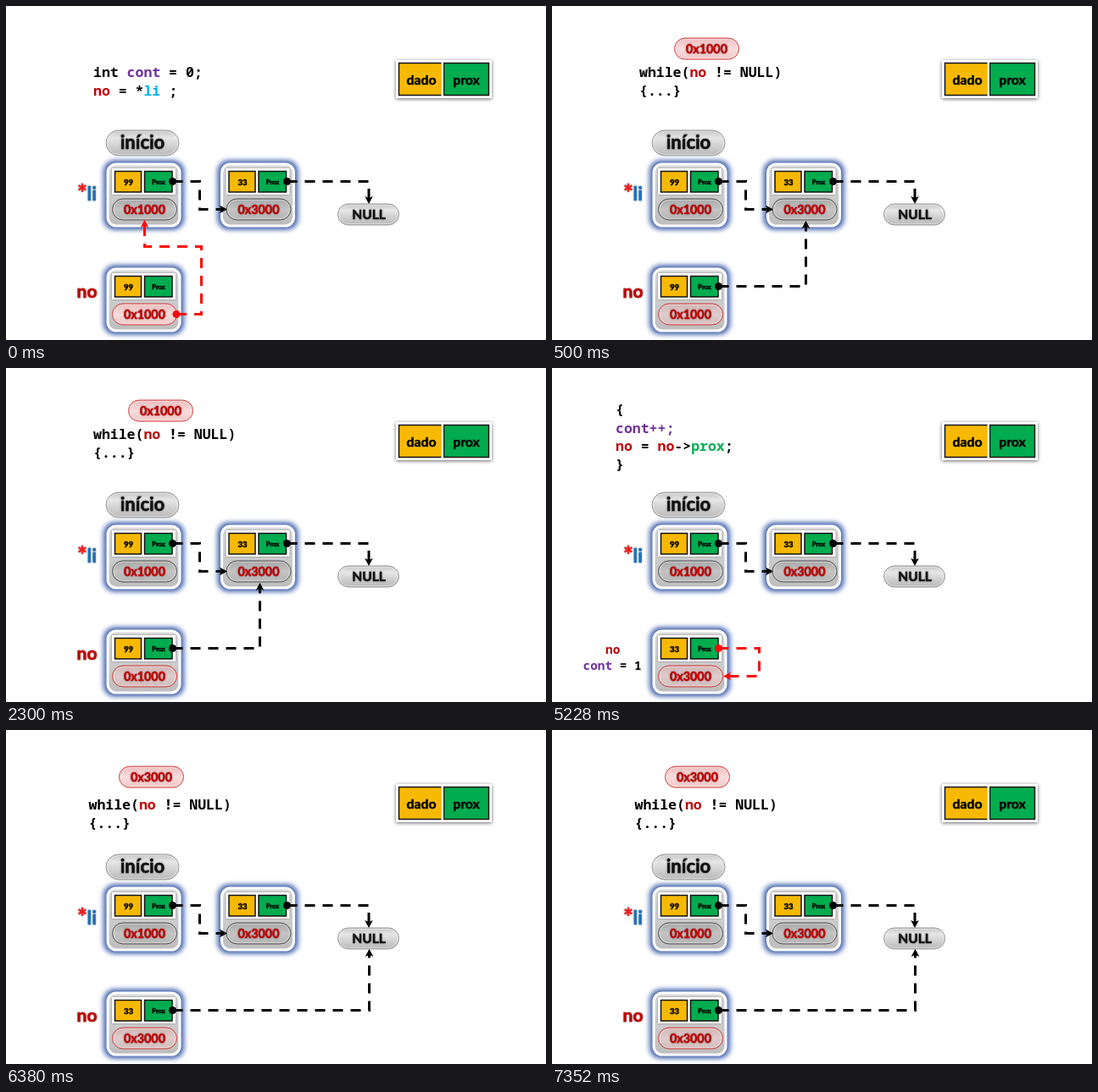
These frames come from a looping animation (637 px wide and 395 px high, 8000 ms). An HTML page:

```html
<!DOCTYPE html>
<html lang="pt">
<head>
<meta charset="utf-8">
<style>
html, body { margin: 0; height: 100%; overflow: hidden; background: #fff; }
svg { display: block; width: 637px; height: 395px; }
text { font: bold 14.3px Lato, "Open Sans", sans-serif; white-space: pre; }
.mid { text-anchor: middle; }
.heavy { stroke: currentColor; stroke-width: .5px; }
.code { font-family: "Noto Sans Mono", "DejaVu Sans Mono", monospace; font-weight: 600; }
.soft { filter: drop-shadow(.7px .7px .8px #0006); }
</style>
</head>
<body>
<svg id="stage" viewBox="0 0 637 395">
  <defs>
    <linearGradient id="grey" x2="0" y2="1">
      <stop stop-color="#c4c4c4"/><stop offset=".3" stop-color="#e6e6e6"/>
      <stop offset=".6" stop-color="#d2d2d2"/><stop offset="1" stop-color="#b8b8b8"/>
    </linearGradient>
    <linearGradient id="dark" x2="0" y2="1">
      <stop stop-color="#a8a8a8"/><stop offset=".5" stop-color="#c4c4c4"/><stop offset="1" stop-color="#b4b4b4"/>
    </linearGradient>
    <linearGradient id="pink" x2="0" y2="1">
      <stop stop-color="#eebcbc"/><stop offset=".5" stop-color="#f8dcdc"/><stop offset="1" stop-color="#f0c8c8"/>
    </linearGradient>
    <linearGradient id="rose" x2="0" y2="1">
      <stop stop-color="#d2b4b4"/><stop offset=".5" stop-color="#dfcccc"/><stop offset="1" stop-color="#d2bcbc"/>
    </linearGradient>
    <linearGradient id="panel" x2="0" y2="1">
      <stop stop-color="#dcdcdc"/><stop offset="1" stop-color="#bdbdbd"/>
    </linearGradient>
    <filter id="blur" x="-30%" y="-30%" width="160%" height="160%"><feGaussianBlur stdDeviation="2.6"/></filter>
  </defs>
  <g id="fixed"></g>
  <g id="scene"></g>
</svg>
<script>
const RED = '#c00000', PURPLE = '#7030a0', GREEN = '#00b050', CYAN = '#00b0f0';
const GOLD = '#f7b900', LEAF = '#00ac4e', HOT = '#f80a0a';
const EDGE = 'stroke="#111" stroke-width="1.5"';

const rect = (x, y, w, h, fill, more = '') =>
  `<rect x="${x}" y="${y}" width="${w}" height="${h}" fill="${fill}" ${more}/>`;

const label = (x, y, size, str, fill = '#000', cls = 'mid heavy') =>
  `<text x="${x}" y="${y}" class="${cls}" fill="${fill}" style="font-size:${size}px;color:${fill}">${str}</text>`;

// Each line is a list of strings or [string, colour] pairs.
const code = (x, y, lines, size = 16.5) => lines.map((line, i) => {
  const spans = line.map(part => {
    const [str, fill] = [].concat(part);
    return `<tspan fill="${fill || '#000'}">${str}</tspan>`;
  });
  return label(x, y + i * 21.6, size, spans.join(''), '#000', 'code');
}).join('');

const pill = (x, y, w, h, fill, edge) =>
  rect(x, y, w, h, fill, `rx="${h / 2}" stroke="${edge}"`) +
  rect(x + 1.5, y + 1.5, w - 3, h - 3, 'none', `rx="${h / 2 - 1.5}" stroke="#fff" stroke-opacity=".4"`);

const redPill = (x, y, str, fill = 'url(#pink)') =>
  pill(x, y, 76, 25, fill, '#d33c3c') + label(x + 38, y + 17.5, 14.3, str, RED, 'mid heavy soft');

function node(x, y, value, address, red) {
  return `<g transform="translate(${x} ${y})">` +
    rect(-6, -5, 99, 85, '#a9b8dc', 'rx="15" filter="url(#blur)"') +
    rect(-2, -2, 91, 79, '#3e5ea6', 'rx="12" filter="url(#blur)"') +
    rect(1, 1, 85, 73, 'url(#panel)', 'rx="10" stroke="#fff" stroke-width="3"') +
    rect(6, 6, 75, 31, '#fff', 'class="soft"') +
    rect(9.5, 9.5, 31, 24.5, GOLD, EDGE) +
    rect(44.5, 9.5, 32.5, 24.5, LEAF, EDGE) +
    label(25.5, 25.5, 9.5, value) + label(61, 24.5, 7.5, 'Prox') +
    (red ? redPill(6.5, 42, address, red)
         : pill(6.5, 42, 76, 25, 'url(#dark)', '#555') + label(44.5, 59.5, 14.3, address, RED, 'mid heavy soft')) +
    '</g>';
}

// Dashed connector: a dot at the first point, an arrowhead at the last.
function arrow(points, color = '#000') {
  const [x, y] = points[0], [ex, ey] = points.at(-1), [px, py] = points.at(-2);
  const angle = Math.atan2(ey - py, ex - px);
  const tip = [ex - 4 * Math.cos(angle), ey - 4 * Math.sin(angle)];
  return `<path d="M${[...points.slice(0, -1), tip].join('L')}" fill="none" stroke="${color}" stroke-width="3" stroke-dasharray="12 9"/>
    <circle cx="${x}" cy="${y}" r="4.5" fill="${color}"/>
    <path d="M0 0L-9-4.8-7 0-9 4.8Z" fill="${color}" transform="translate(${ex} ${ey}) rotate(${angle * 180 / Math.PI})"/>`;
}

const pointerName = label(95.5, 345, 21, 'no', RED, 'mid heavy soft');
const loopHead = (x, y) => code(x, y, [['while(', ['no', RED], ' != NULL)'], ['{...}']]);

document.getElementById('fixed').innerHTML =
  rect(460, 64, 113, 45, '#fff', 'style="filter:drop-shadow(.5px 1px 2px #0009)"') +
  rect(463.5, 67.5, 51, 38, GOLD, EDGE) +
  rect(516.5, 67.5, 53, 38, LEAF, EDGE) +
  rect(513.5, 65, 2.5, 43, '#fff') +
  label(490, 93, 15.8, 'dado') + label(543, 93, 15.8, 'prox') +
  pill(118, 147, 86, 30, 'url(#grey)', '#999') + label(161, 169, 22, 'início', '#111', 'mid heavy soft') +
  label(84, 231, 28, '*', '#f01818', 'heavy soft') + label(95.5, 229.5, 23, 'li', '#1d70b8', 'heavy soft') +
  node(119, 186, '99', '0x1000') + node(253.5, 186, '33', '0x3000') +
  pill(391.5, 234, 72, 25, 'url(#grey)', '#999') + label(428, 252, 15.5, 'NULL', '#111', 'mid heavy soft') +
  arrow([[196.5, 207.5], [228.5, 207.5], [228.5, 240.5], [261, 240.5]]) +
  arrow([[331.5, 207.5], [428, 207.5], [428, 234]]);

const scenes = [
  [0,
    code(103, 84, [['int ', ['cont', PURPLE], ' = 0;'], [['no', RED], ' = *', ['li', CYAN], ' ;']]) +
    pointerName + node(119, 310, '99', '0x1000', 'url(#pink)') +
    arrow([[201, 364.5], [230.5, 364.5], [230.5, 284.5], [163.5, 284.5], [163.5, 253]], HOT)],
  [500,
    redPill(144.5, 38, '0x1000') + loopHead(103, 84) +
    pointerName + node(119, 310, '99', '0x1000', 'url(#rose)') +
    arrow([[196.5, 331.5], [299.5, 331.5], [299.5, 254]])],
  [3500,
    code(75, 55, [['{'], [['cont++;', PURPLE]], [['no', RED], ' = ', ['no', RED], '-&gt;', ['prox', GREEN], ';'], ['}']]) +
    code(63, 338, [[['no', RED]]], 14.4) + code(36.5, 357, [[['cont', PURPLE], ' = 1']], 14.4) +
    node(119, 310, '33', '0x3000', 'url(#rose)') +
    arrow([[196.5, 331.5], [244.5, 331.5], [244.5, 364.5], [202, 364.5]], HOT)],
  [6380,
    redPill(133.5, 43, '0x3000') + loopHead(97.5, 94) +
    pointerName + node(119, 310, '33', '0x3000', 'url(#rose)') +
    arrow([[196.5, 331.5], [428.5, 331.5], [428.5, 259]])]
];

const stage = document.getElementById('scene');
let shown;
function draw(now) {
  const current = scenes.findLast(([start]) => now % 8000 >= start);
  if (current !== shown) {
    shown = current;
    stage.innerHTML = current[1];
  }
  requestAnimationFrame(draw);
}
draw(performance.now());
</script>
</body>
</html>
```
